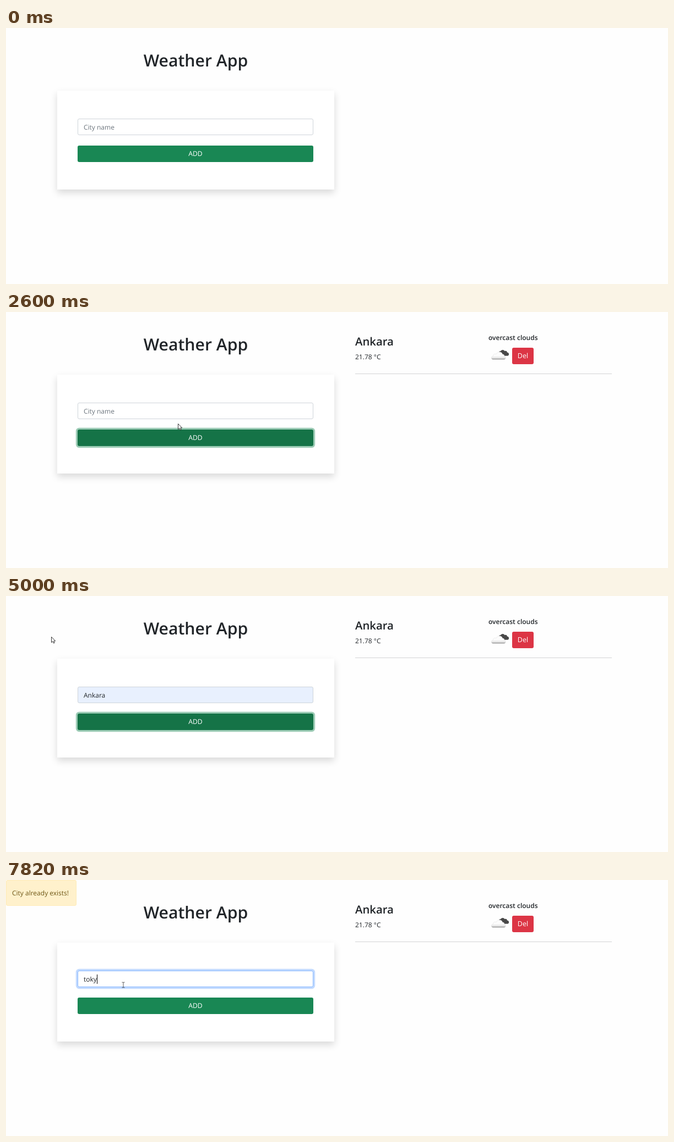
Animation, 1202 px wide and 466 px high, one loop 8 s. Source, as an HTML page:

```html
<!DOCTYPE html>
<html lang="en">
<head>
<meta charset="utf-8">
<title>Weather App</title>
<style>
  html, body { margin: 0; width: 100%; height: 100%; overflow: hidden; background: #fefefe; }
  body {
    position: relative; color: #212529;
    font: 12px/20px "Open Sans", "Noto Sans", sans-serif;
    text-rendering: geometricPrecision;
  }
  div, svg { position: absolute; box-sizing: border-box; white-space: pre; }
  .hidden { display: none; }
  .semi { font-weight: 600; }
  .mid { text-align: center; color: #fff; font-weight: 500; line-height: 30px; border-radius: 3px; }

  #title { left: 93px; top: 39px; width: 503px; text-align: center; font-size: 30.2px; line-height: 40px; }
  #card { left: 93px; top: 114px; width: 503px; height: 180px; background: #fff; box-shadow: 0 6.3px 12.6px rgba(0,0,0,.15); }
  #field {
    left: 130px; top: 164.5px; width: 428px; height: 30.5px; padding-left: 10px; line-height: 29px;
    background: #fff; border: 1px solid #ced4da; border-radius: 3px;
  }
  #field.auto { background: #e8f0fe; }
  #field.half { border-color: #9dc3fc; box-shadow: 0 0 0 2.8px rgba(13,110,253,.18); }
  #field.full { border-color: #86b7fe; box-shadow: 0 0 0 3.2px rgba(13,110,253,.25); }
  #hint { left: 10px; top: 0; color: #6c757d; }
  #caret { display: inline-block; width: 1.3px; height: 17px; margin-right: -1.3px; vertical-align: -4px; background: #000; }
  #caret.hidden { display: none; }

  #add { left: 130px; top: 214px; width: 428px; height: 30px; background: #198754; font-size: 12.2px; }
  #add.dark { background: #157347; }
  #add.half { box-shadow: 0 0 0 2px rgba(60,153,110,.3); }
  #add.full { box-shadow: 0 0 0 3.2px rgba(60,153,110,.5); }

  #list {
    left: 130px; top: 195px; width: 152px; height: 70.500px; background: #292a2d; color: #f1f1f2;
    border-radius: 0 0 2px 2px; box-shadow: 0 1px 2px rgba(0,0,0,.4); font-size: 9.6px; line-height: 28px;
  }
  #list div { left: 0; width: 152px; height: 28px; padding-left: 8px; }
  #list.pick #first { background: #45464a; }
  #first { top: 8px; }
  #second { top: 36px; }

  #city { left: 634px; top: 38px; font-size: 20.3px; line-height: 30px; }
  #temp { left: 634px; top: 72px; }
  #sky { left: 876px; top: 37px; }
  #icon { left: 878px; top: 64px; }
  #del { left: 919px; top: 64.5px; width: 39px; height: 30px; background: #dc3545; font-size: 12.5px; }
  #rule { left: 634px; top: 112px; width: 466px; height: 1px; background: #d2d3d4; }
  #alert {
    left: 0; top: 0; width: 127.5px; height: 46.5px; padding-left: 10px; line-height: 45px;
    color: #6d5614; background: #fff1cc; border: 1px solid #ffebb8; border-radius: 3px;
  }
  #pointer { left: 0; top: 0; overflow: visible; }
</style>
</head>
<body>
  <div id="title" class="semi">Weather App</div>
  <div id="card"></div>
  <div id="field"><div id="hint">City name</div><span id="text"></span><span id="caret"></span></div>
  <div id="add" class="mid">ADD</div>
  <div id="list" class="semi"><div id="first">Ankara</div><div id="second">stack-deneme-1</div></div>

  <div id="panel">
    <div id="city" class="semi">Ankara</div>
    <div id="temp">21.78 °C</div>
    <div id="sky" class="semi">overcast clouds</div>
    <svg id="icon" width="38" height="30">
      <defs>
        <linearGradient id="shade" x1="0" y1="0" x2="0" y2="1">
          <stop offset=".5" stop-color="#fcfcfc"/><stop offset=".8" stop-color="#e6e6e6"/><stop offset="1" stop-color="#858585"/>
        </linearGradient>
      </defs>
      <path fill="#484848" d="M17.500 10C17 7.500 18.500 6.800 20 7.500C21 4.500 26 4 27.500 7.200C30 6 32 7.500 31.800 9.500C36 9.500 36.300 15.500 32.500 15.800H22Z"/>
      <path fill="url(#shade)" stroke="#d6d6d6" stroke-width=".4" d="M6.500 22.500C2.200 22.500 2.200 16.500 6.500 16.200C6 13 10 11.200 12 12.800C14 7.500 22.500 7.500 23.500 13C26 12.500 27.500 15 26.800 16.500C30.500 17 30 22.500 26 22.500Z"/>
    </svg>
    <div id="del" class="mid">Del</div>
    <div id="rule"></div>
  </div>
  <div id="alert">City already exists!</div>

  <svg id="pointer" width="1" height="1">
    <circle id="glow" r="9.600" fill="#f0dc00" fill-opacity=".6"/>
    <path id="arrow" fill="#fff" stroke="#222" stroke-width=".9" stroke-linejoin="round" d="M.5 .5V10.700L2.900 8.500L4.500 12L6.200 11.200L4.700 7.900H7.700Z"/>
    <path id="hand" fill="#fff" stroke="#333" stroke-width=".7" stroke-linejoin="round" d="M-.8 8V1C-.8 -.3 1.200 -.3 1.200 1V5L5 5.700Q6.400 6 6.300 7.500L5.600 10.500V13H-.2V11.500L-3.500 8C-4.200 6.800 -2.800 6 -2 6.900Z"/>
    <path id="beam" fill="none" stroke="#333" stroke-opacity=".8" d="M-2.500 -4.800H-.8L0 -4.300L.8 -4.800H2.500M0 -4.300V4.300M-2.500 4.800H-.8L0 4.300L.8 4.800H2.500"/>
  </svg>

<script>
const LOOP = 8000;
const $ = id => document.getElementById(id);
const show = (id, on) => $(id).classList.toggle('hidden', !on);
const at = (shape, x, y) => ({ shape, x, y });

const start = {
  shape: '', x: 0, y: 0, click: 0, text: '', auto: 0, caret: 0,
  field: '', add: '', hover: 0, list: 0, pick: 0, panel: 0, alert: 0
};

// Each step lists only what changes from the one before.
const steps = [
  [0, {}],
  [200, at('arrow', 931, 403)],
  [400, at('arrow', 742, 330)],
  [600, { ...at('hand', 500, 234), hover: 1 }],
  [800, { ...at('beam', 310, 184), hover: 0 }],
  [1000, { ...at('beam', 292, 182), click: 1, field: 'half', list: 1, caret: 1 }],
  [1200, { click: 0, field: 'full' }],
  [1400, { text: 'Ank', list: 0 }],
  [1600, { ...at('hand', 362, 224), text: 'Ankara', hover: 1 }],
  [1800, { ...at('hand', 370, 226), click: 1, field: 'half', caret: 0 }],
  [2000, { click: 0, field: '', add: 'full' }],
  [2200, at('hand', 367, 226)],
  [2400, at('hand', 356, 225)],
  [2600, { ...at('arrow', 312, 203), text: '', panel: 1, hover: 0 }],
  [2800, at('beam', 262, 183)],
  [3000, { ...at('beam', 255, 182), click: 1, field: 'half', add: '', list: 1, caret: 1 }],
  [3210, { click: 0, field: 'full' }],
  [3600, { ...at('arrow', 232, 213), pick: 1, text: 'Ankara', auto: 1, caret: 0 }],
  [3800, { ...at('arrow', 229, 215), click: 1 }],
  [4010, { ...at('arrow', 274, 210), click: 0, list: 0, pick: 0, caret: 1 }],
  [4210, { ...at('hand', 332, 225), hover: 1 }],
  [4420, { ...at('hand', 336, 227), click: 1, field: 'half', add: 'half', caret: 0 }],
  [4620, { ...at('arrow', 97, 39), click: 0, hover: 0, field: '', add: 'full' }],
  [4800, at('arrow', 88, 58)],
  [5000, at('arrow', 82, 74)],
  [5200, at('arrow', 82, 70)],
  [5400, { ...at('arrow', 83, 60), text: '', auto: 0, alert: 1 }],
  [5600, at('arrow', 86, 48)],
  [5800, at('arrow', 88, 43)],
  [6000, at('arrow', 132, 98)],
  [6200, at('beam', 206, 185)],
  [6400, { ...at('beam', 213, 191), click: 1, field: 'half', add: '', list: 1, caret: 1 }],
  [6600, { click: 0, field: 'full' }],
  [7010, { text: 't', list: 0 }],
  [7210, { text: 'to' }],
  [7410, { text: 'tok' }],
  [7620, { caret: 0 }],
  [7820, { text: 'toky', caret: 1 }]
];

let last = start;
const scenes = steps.map(([time, change]) => ({ time, state: last = { ...last, ...change } }));

function draw(s) {
  $('text').textContent = s.text;
  $('field').className = s.field + (s.auto ? ' auto' : '');
  $('add').className = 'mid ' + s.add + (s.hover || s.add ? ' dark' : '');
  show('hint', !s.text);
  show('caret', s.caret);
  show('list', s.list);
  $('list').classList.toggle('pick', !!s.pick);
  show('panel', s.panel);
  show('alert', s.alert);
  show('glow', s.click);
  for (const shape of ['arrow', 'hand', 'beam']) show(shape, s.shape === shape);
  $('pointer').style.transform = `translate(${s.x}px, ${s.y}px)`;
}

let shown;
function tick() {
  const t = performance.now() % LOOP;
  const scene = scenes.filter(s => s.time <= t).pop();
  if (scene !== shown) draw((shown = scene).state);
  requestAnimationFrame(tick);
}
tick();
</script>
</body>
</html>
```
